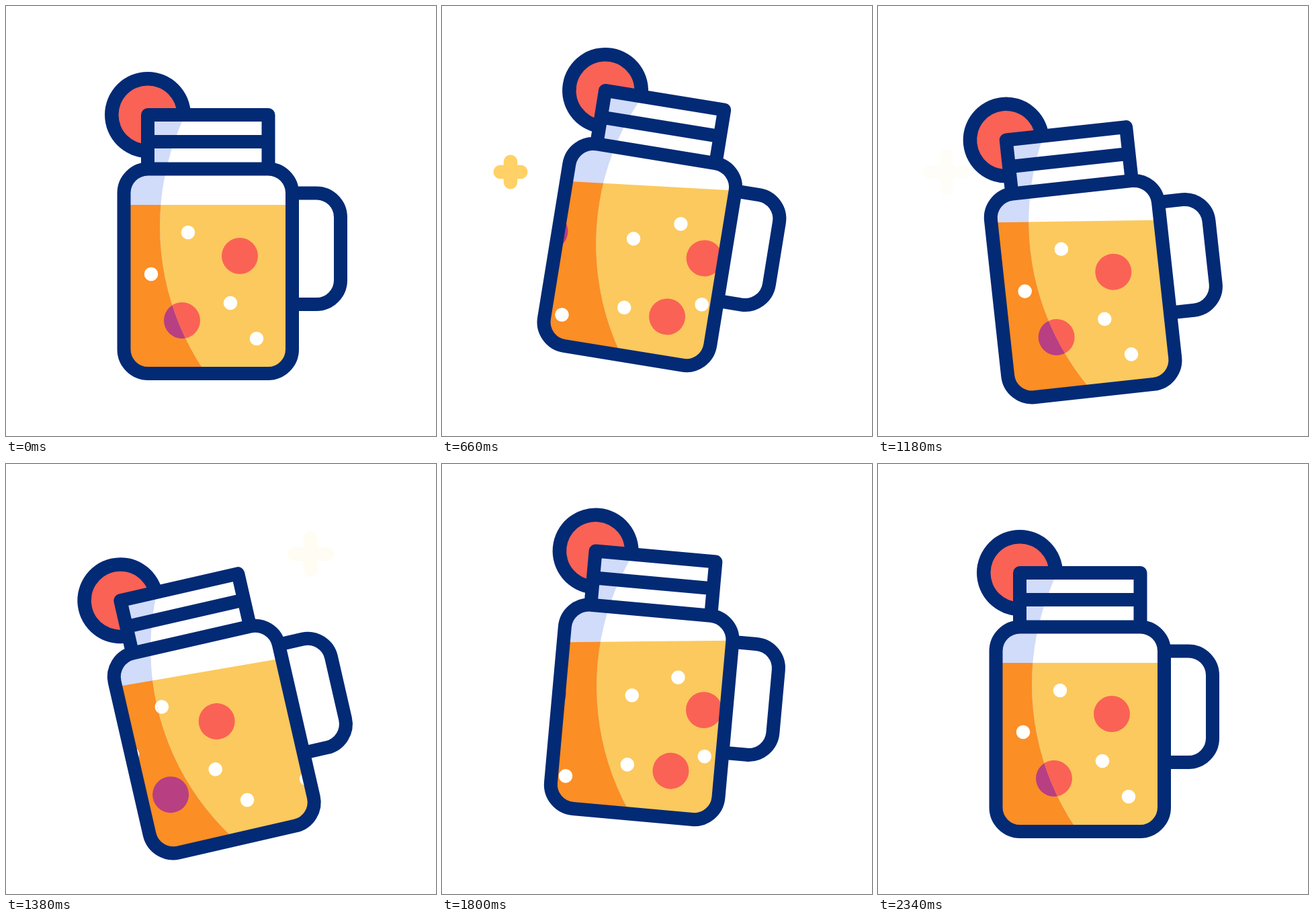
Recreate the animation shown at these times as an HTML page with a canvas. Size 640x640 px, loop 2400 ms.

```html
<!DOCTYPE html>
<html lang="en">
<head>
<meta charset="utf-8">
<title>Shaking jar</title>
<style>
  html, body { margin: 0; width: 100%; height: 100%; overflow: hidden; background: #fff; }
  canvas { display: block; }
</style>
</head>
<body>
<canvas id="stage" width="640" height="640"></canvas>
<script>
const ctx = document.getElementById('stage').getContext('2d');
const LOOP = 2400, FADE = 220;
const NAVY = '#032a75', CORAL = '#fa6255', STAR = '#ffce5a';
const LIT = { glass: '#fff', juice: '#fbc95d', berry: CORAL };
const SHADE = { glass: '#d1dbfa', juice: '#fb8e24', berry: '#b83f82' };

// Rest, three turning points, rest. The tilt trails the hop.
const HOP = [120, 600, 1193, 1830, 2340];
const TILT = [120, 760, 1430, 1970, 2340];

const berries = [[348, 372], [262, 468], [529.5, 489], [580, 399]];
const bubbles = [[271, 337], [216, 399], [334, 442], [373, 495],
                 [473, 376], [542, 350], [465, 479], [580, 468]];

function ease(u) {
  u = Math.min(1, Math.max(0, u));
  return (1 - Math.cos(Math.PI * u)) / 2;
}

// Swings from 0 through the three peaks and back to 0.
function swing(t, beats, ...peaks) {
  const stops = [0, ...peaks, 0];
  let value = 0;
  for (let i = 1; i < beats.length; i++) {
    const u = (t - beats[i - 1]) / (beats[i] - beats[i - 1]);
    value += (stops[i] - stops[i - 1]) * ease(u);
  }
  return value;
}

function turn(x, y, degrees) {
  ctx.translate(x, y);
  ctx.rotate(degrees * Math.PI / 180);
  ctx.translate(-x, -y);
}

function dot(x, y, r, color) {
  ctx.beginPath();
  ctx.arc(x, y, r, 0, 7);
  ctx.fillStyle = color;
  ctx.fill();
}

function outline(path) {
  ctx.strokeStyle = NAVY;
  ctx.lineWidth = 20;
  ctx.stroke(path);
}

function roundRect(x, y, w, h, r) {
  const path = new Path2D();
  path.roundRect(x, y, w, h, r);
  return path;
}

const body = roundRect(175.5, 242.5, 250.5, 304.5, 36);
const handle = roundRect(380, 278.5, 118, 165.5, 36);
const neck = new Path2D('M211 242V162H390.5V242M211 202H390.5');
const inside = new Path2D('M211 162H390.5V242H211Z');
inside.addPath(body);
const shadow = new Path2D('M0 0H1200V900H0Z');
shadow.arc(613, 328, 384, 0, 7);

function contents(t, colors) {
  ctx.fillStyle = colors.glass;
  ctx.fill(inside);
  ctx.save();
  ctx.clip(body);
  ctx.translate(0, swing(t, HOP, -5, -2.5, -7));
  turn(301, 296, swing(t, HOP, -6.3, 5.4, -5.8));
  ctx.fillStyle = colors.juice;
  ctx.fillRect(0, 296, 640, 400);
  ctx.translate(swing(t, HOP, -199, 8, -198), 0);
  for (const [x, y] of berries) dot(x, y, 27, colors.berry);
  for (const [x, y] of bubbles) dot(x, y, 10.3, '#fff');
  ctx.restore();
}

function jar(t) {
  ctx.save();
  ctx.translate(0, swing(t, HOP, -25.5, 26.7, -25.5));
  turn(301, 354.5, swing(t, TILT, 9.8, -13.2, 10.4));
  ctx.lineJoin = 'round';
  dot(211, 162, 64, NAVY);
  dot(211, 162, 43.5, CORAL);
  outline(handle);
  contents(t, LIT);
  ctx.save();
  ctx.clip(shadow, 'evenodd');
  contents(t, SHADE);
  ctx.restore();
  outline(neck);
  outline(body);
  ctx.restore();
}

// A plus whose arms shorten as it fades in and stretch as it fades out.
function sparkle(x, y, t, start, end) {
  const alpha = ease(Math.min(t - start, end - t) / FADE);
  const arm = 25 - 10.5 * alpha;
  ctx.save();
  ctx.globalAlpha = alpha;
  ctx.strokeStyle = STAR;
  ctx.lineWidth = 20.5;
  ctx.lineCap = 'round';
  ctx.beginPath();
  ctx.moveTo(x - arm, y);
  ctx.lineTo(x + arm, y);
  ctx.moveTo(x, y - arm);
  ctx.lineTo(x, y + arm);
  ctx.stroke();
  ctx.restore();
}

function draw(t) {
  ctx.fillStyle = '#fff';
  ctx.fillRect(0, 0, 640, 640);
  sparkle(102, 247, t, 480, 1210);
  sparkle(453, 134, t, 1344, 1784);
  jar(t);
}

const began = performance.now();
function frame() {
  draw((performance.now() - began) % LOOP);
  requestAnimationFrame(frame);
}
frame();
</script>
</body>
</html>
```
